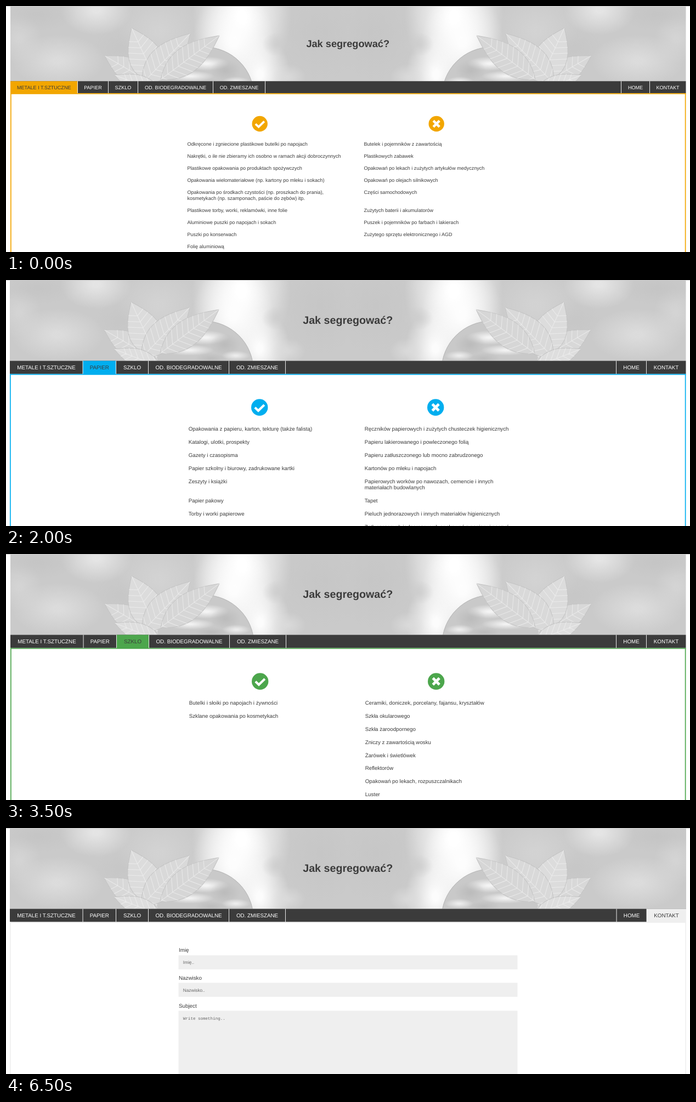
An HTML page with a canvas that plays this animation: 1247x449 px, repeating every 7.5 s.

```html
<!DOCTYPE html>
<html lang="pl">
<head>
<meta charset="utf-8">
<title>Jak segregować?</title>
<style>
html, body { margin: 0; width: 100%; height: 100%; overflow: hidden; background: #fff; }
canvas { display: block; }
</style>
</head>
<body>
<canvas id="stage" width="1247" height="449"></canvas>
<script>
const W = 1247, H = 449, LOOP = 7500, INK = '#3b3b3b';
const SANS = '"Liberation Sans", Arial, sans-serif';
const MONO = '"Liberation Mono", monospace';
const ctx = document.getElementById('stage').getContext('2d');

const small = {
  title: 18.2, titleY: 75.3, text: 9.04, nav: 9.08, navTop: 137.2, navH: 22,
  tabs: [0, 122.5, 178.5, 232.5, 369.5, 464.5], rightTabs: [-118, -66, 0],
  iconY: 215, iconR: 14.2, colX: 301.5, colW: 322, pad: 28.5, rowTop: 240.5, rowH: 22, line: 11
};
const large = {
  title: 19.66, titleY: 80.3, text: 9.76, nav: 9.8, navTop: 147.5, navH: 24,
  tabs: [0, 133, 193.5, 252.5, 399.5, 502.5], rightTabs: [-127, -72, 0],
  iconY: 232.5, iconR: 15.2, colX: 302.5, colW: 321, pad: 30.7, rowTop: 260.1, rowH: 23.85, line: 11.85
};
const leftLabels = ['METALE I T.SZTUCZNE', 'PAPIER', 'SZKLO', 'OD. BIODEGRADOWALNE', 'OD. ZMIESZANE'];
const rightLabels = ['HOME', 'KONTAKT'];

// Each row holds the "yes" and "no" cells; "|" breaks a line.
const metal = { tab: 0, color: '#f2a600', layout: small, rows: [
  ['Odkręcone i zgniecione plastikowe butelki po napojach', 'Butelek i pojemników z zawartością'],
  ['Nakrętki, o ile nie zbieramy ich osobno w ramach akcji dobroczynnych', 'Plastikowych zabawek'],
  ['Plastikowe opakowania po produktach spożywczych', 'Opakowań po lekach i zużytych artykułów medycznych'],
  ['Opakowania wielomateriałowe (np. kartony po mleku i sokach)', 'Opakowań po olejach silnikowych'],
  ['Opakowania po środkach czystości (np. proszkach do prania),|kosmetykach (np. szamponach, paście do zębów) itp.', 'Części samochodowych'],
  ['Plastikowe torby, worki, reklamówki, inne folie', 'Zużytych baterii i akumulatorów'],
  ['Aluminiowe puszki po napojach i sokach', 'Puszek i pojemników po farbach i lakierach'],
  ['Puszki po konserwach', 'Zużytego sprzętu elektronicznego i AGD'],
  ['Folię aluminiową', '']
] };
const paper = { tab: 1, color: '#00aeef', layout: large, rows: [
  ['Opakowania z papieru, karton, tekturę (także falistą)', 'Ręczników papierowych i zużytych chusteczek higienicznych'],
  ['Katalogi, ulotki, prospekty', 'Papieru lakierowanego i powleczonego folią'],
  ['Gazety i czasopisma', 'Papieru zatłuszczonego lub mocno zabrudzonego'],
  ['Papier szkolny i biurowy, zadrukowane kartki', 'Kartonów po mleku i napojach'],
  ['Zeszyty i książki', 'Papierowych worków po nawozach, cemencie i innych|materiałach budowlanych'],
  ['Papier pakowy', 'Tapet'],
  ['Torby i worki papierowe', 'Pieluch jednorazowych i innych materiałów higienicznych'],
  ['', 'Zatłuszczonych jednorazowych opakowań z papieru i naczyń']
] };
const glass = { tab: 2, color: '#4ca64c', layout: large, rows: [
  ['Butelki i słoiki po napojach i żywności', 'Ceramiki, doniczek, porcelany, fajansu, kryształów'],
  ['Szklane opakowania po kosmetykach', 'Szkła okularowego'],
  ['', 'Szkła żaroodpornego'],
  ['', 'Zniczy z zawartością wosku'],
  ['', 'Żarówek i świetlówek'],
  ['', 'Reflektorów'],
  ['', 'Opakowań po lekach, rozpuszczalnikach'],
  ['', 'Luster']
] };
const bio = { tab: 3, color: '#c86b33', layout: large, dy: 0.5, rows: [
  ['Odpadki warzywne i owocowe (w tym obierki itp.)', 'Kości zwierząt'],
  ['Gałęzie drzew i krzewów', 'Oleju jadalnego'],
  ['Skoszoną trawę, liście, kwiaty', 'Odchodów zwierząt'],
  ['Trociny i korę drzew', 'Popiołu z węgla kamiennego'],
  ['Popiołu z węgla kamiennego', 'Leków'],
  ['Resztki jedzenia', 'Drewna impregnowanego'],
  ['', 'Płyt wiórowych i pilśniowych MDF'],
  ['', 'Ziemi i kamieni']
] };
const mixed = { tab: 4, color: '#5f6b86', layout: large, dy: 1, body: drawMixed };
const contact = { tab: 6, color: '#efefef', layout: large, body: drawContact };

// hover: [column, row]
const scenes = [
  { at: 0, page: metal, left: 8, right: 1239.5 },
  { at: 500, page: metal, left: 8, right: 1239.5, hover: [0, 0] },
  { at: 1000, page: metal, left: 7, right: 1238.5, hover: [1, 0] },
  { at: 1500, page: metal, left: 8, right: 1239.5 },
  { at: 2000, page: paper, left: 7, right: 1239.5 },
  { at: 2500, page: paper, left: 8, right: 1239.5, hover: [0, 1] },
  { at: 3000, page: paper, left: 8, right: 1239.5, hover: [1, 1] },
  { at: 3500, page: glass, left: 8, right: 1239.5 },
  { at: 4500, page: bio, left: 8, right: 1239.5, hover: [1, 4] },
  { at: 5500, page: mixed, left: 7, right: 1240 },
  { at: 6500, page: contact, left: 7, right: 1240 }
];

function rect(x, y, w, h, color) {
  ctx.fillStyle = color;
  ctx.fillRect(x, y, w, h);
}

function text(str, x, y, size, { color = INK, align = 'left', weight = '', family = SANS } = {}) {
  ctx.font = `${weight} ${size}px ${family}`;
  ctx.textRendering = 'geometricPrecision';
  ctx.textAlign = align;
  ctx.fillStyle = color;
  ctx.fillText(str, x, y);
}

function makeBanner() {
  const half = document.createElement('canvas');
  half.width = W / 2 + 1;
  half.height = 150;
  const g = half.getContext('2d');

  const blob = (x, y, rx, ry, tone, alpha) => {
    g.save();
    g.translate(x, y);
    g.scale(rx, ry);
    const fade = g.createRadialGradient(0, 0, 0.1, 0, 0, 1);
    fade.addColorStop(0, `rgba(${tone},${tone},${tone},${alpha})`);
    fade.addColorStop(1, `rgba(${tone},${tone},${tone},0)`);
    g.fillStyle = fade;
    g.fillRect(-1, -1, 2, 2);
    g.restore();
  };
  const leaf = (tipX, tipY, baseX, baseY, width, tone) => {
    const dx = baseX - tipX, dy = baseY - tipY, len = Math.hypot(dx, dy);
    g.save();
    g.translate(tipX, tipY);
    g.rotate(Math.atan2(dy, dx));
    g.beginPath();
    g.moveTo(0, 0);
    g.bezierCurveTo(len * .3, -width * .5, len * .65, -width, len, 0);
    g.bezierCurveTo(len * .65, width, len * .3, width * .5, 0, 0);
    g.fillStyle = tone;
    g.fill();
    g.lineWidth = 1;
    g.strokeStyle = '#c3c3c3';
    g.stroke();
    g.clip();
    g.beginPath();
    g.moveTo(0, 0);
    g.lineTo(len, 0);
    for (let x = len * .25; x < len; x += 12) {
      g.moveTo(x - 16, -width * .6);
      g.lineTo(x, 0);
      g.lineTo(x - 16, width * .6);
    }
    g.strokeStyle = 'rgba(240,240,240,.75)';
    g.stroke();
    g.restore();
  };

  g.fillStyle = '#cacaca';
  g.fillRect(0, 0, half.width, 150);
  blob(165, 8, 65, 45, 235, .8);
  blob(95, 100, 85, 48, 224, .8);
  blob(25, 60, 40, 45, 216, .7);
  blob(280, 45, 75, 65, 214, .7);
  blob(60, 15, 70, 30, 190, .4);
  blob(210, 75, 50, 35, 193, .35);
  blob(430, 20, 90, 120, 255, 1);
  blob(415, 65, 75, 95, 255, .9);
  blob(463, 125, 55, 75, 252, 1);
  blob(495, 70, 28, 22, 205, .8);
  blob(515, 130, 32, 24, 222, .7);
  blob(575, 50, 85, 85, 196, .6);

  g.save();
  g.beginPath();
  g.arc(362, 165, 90, 0, 7);
  g.fillStyle = '#c9c9c9';
  g.fill();
  g.strokeStyle = '#b4b4b4';
  g.stroke();
  g.clip();
  blob(365, 105, 42, 13, 244, 1);
  blob(400, 118, 28, 20, 180, .6);
  blob(335, 128, 45, 10, 242, 1);
  blob(420, 138, 26, 9, 236, 1);
  blob(375, 143, 30, 10, 182, .6);
  g.restore();

  leaf(180, 91, 278, 148, 42, '#d8d8d8');
  leaf(229, 40, 276, 142, 52, '#dcdcdc');
  leaf(336, 50, 248, 142, 46, '#d9d9d9');
  leaf(389, 54, 282, 134, 42, '#d6d6d6');
  leaf(198, 126, 285, 160, 30, '#dedede');

  const full = document.createElement('canvas');
  full.width = W;
  full.height = 150;
  const f = full.getContext('2d');
  f.drawImage(half, 0, 0);
  f.translate(W, 0);
  f.scale(-1, 1);
  f.drawImage(half, 0, 0);
  return full;
}

function drawIcon(x, y, r, color, isCheck) {
  ctx.save();
  ctx.translate(x, y);
  ctx.scale(r, r);
  ctx.beginPath();
  ctx.arc(0, 0, 1, 0, 7);
  ctx.fillStyle = color;
  ctx.fill();
  ctx.beginPath();
  const points = isCheck
    ? [[-.55, .02], [-.15, .4], [.57, -.3]]
    : [[-.39, -.39], [.39, .39], [-.39, .39], [.39, -.39]];
  points.forEach(([px, py], i) => i === 0 || (!isCheck && i === 2) ? ctx.moveTo(px, py) : ctx.lineTo(px, py));
  ctx.lineWidth = isCheck ? .27 : .32;
  ctx.strokeStyle = '#fff';
  ctx.stroke();
  ctx.restore();
}

function drawTabs(labels, edges, origin, firstIndex, page, top) {
  const { nav, navH } = page.layout;
  labels.forEach((label, i) => {
    const x = origin + edges[i], end = origin + edges[i + 1];
    const active = page.tab === firstIndex + i;
    if (active) rect(x, top, end - x, navH + .5, page.color);
    text(label, (x + end) / 2, top + navH / 2 + 3.3, nav, { color: active ? INK : '#fff', align: 'center' });
  });
  edges.forEach(edge => {
    if (edge) rect(origin + edge - .4, top, .9, navH, '#fff');
  });
}

function drawHeader({ page, left, right }) {
  const { layout: l, dy = 0, color } = page;
  const top = l.navTop + dy, bottom = top + l.navH;
  ctx.save();
  ctx.beginPath();
  ctx.rect(left, 0, right - left, top);
  ctx.clip();
  ctx.drawImage(banner, left - 8, dy);
  ctx.restore();
  rect(0, 0, W, 1 + dy, '#cdcdcd');
  text('Jak segregować?', 623.2, l.titleY + dy, l.title, { weight: 'bold', align: 'center' });

  rect(left, top, right - left, l.navH, INK);
  const end = page === mixed ? 351 : H;
  rect(left, bottom, right - left, 1.7, color);
  rect(left, bottom, 1.7, end - bottom, color);
  rect(right - 1.7, bottom, 1.7, end - bottom, color);
  drawTabs(leftLabels, l.tabs, left, 0, page, top);
  drawTabs(rightLabels, l.rightTabs, right, 5, page, top);
}

function drawLists({ page, left, hover }) {
  const { layout: l, color, rows } = page;
  const shift = left - 7.5;
  const columnX = column => l.colX + shift + column * l.colW;
  [0, 1].forEach(column => drawIcon(columnX(column) + l.colW / 2 - .3, l.iconY, l.iconR, color, !column));

  let y = l.rowTop;
  rows.forEach((cells, row) => {
    const lines = cells.map(cell => cell.split('|'));
    const height = l.rowH + (Math.max(...lines.map(c => c.length)) - 1) * l.line;
    if (hover && hover[1] === row) {
      ctx.globalAlpha = .11;
      rect(columnX(hover[0]), y, l.colW, height, color);
      ctx.globalAlpha = 1;
    }
    lines.forEach((cell, column) => cell.forEach((line, i) =>
      text(line, columnX(column) + l.pad, y + l.rowH / 2 + 3.2 + i * l.line, l.text)));
    y += height;
  });
}

function drawMixed({ page, left, right }) {
  const size = large.text;
  drawIcon(623.5, 232.5, 15.2, page.color, true);
  text('Do pojemnika z odpadami zmieszanymi należy wrzucać wszystko to, czego nie można odzyskać w procesie recyklingu, z wyłączeniem odpadów', 302.5, 283.3, size);
  text('niebezpiecznych.', 302.5, 301.2, size);
  rect(left, 349.4, right - left, 1.7, page.color);
  rect(left, 351, right - left, 49.6, '#efefef');
  text('ovk -', 583, 378.6, 7.9, { weight: 'bold' });
  text('copyright © 2020', 664, 378.6, 7.9, { align: 'right' });
}

function drawContact() {
  const field = (label, hint, y, height, family, size) => {
    text(label, 315, y - 6, 9.8);
    rect(314.5, y, 618, height, '#efefef');
    text(hint, 322.8, y + 16, size, { color: '#666', family });
  };
  field('Imię', 'Imię..', 232.3, 25.7, SANS, 8.25);
  field('Nazwisko', 'Nazwisko..', 282.5, 25.7, SANS, 8.25);
  field('Subject', 'Write something..', 333.5, 116, MONO, 7.55);
}

const banner = makeBanner();

function render(now) {
  const time = now % LOOP;
  const scene = scenes.findLast(s => s.at <= time);
  rect(0, 0, W, H, '#fff');
  drawHeader(scene);
  (scene.page.body || drawLists)(scene);
  requestAnimationFrame(render);
}
render(0);
</script>
</body>
</html>
```
